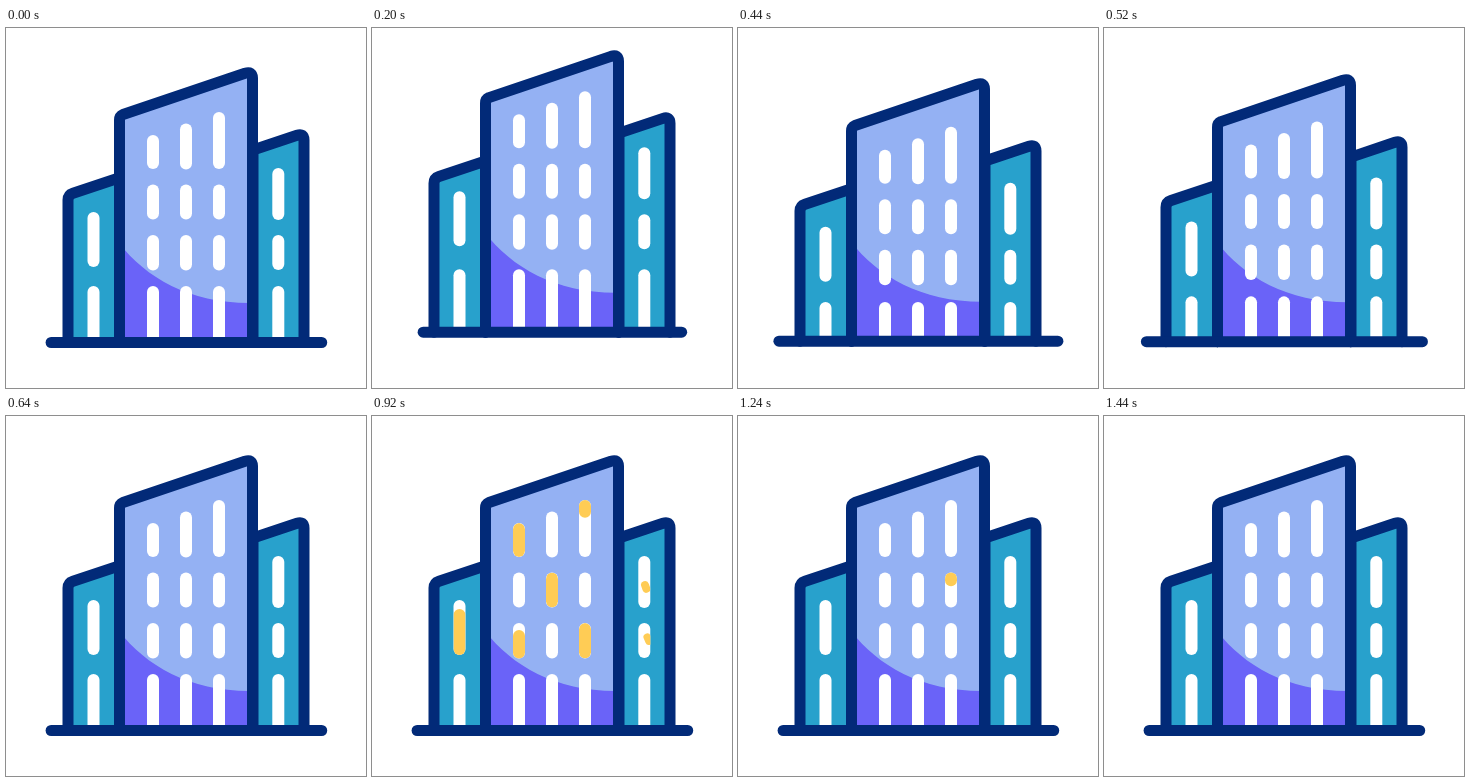
An HTML page with a canvas for the animation above (1.48 s loop, 360 by 360 pixels).

```html
<!DOCTYPE html>
<html lang="en">
<head>
<meta charset="utf-8">
<title>Buildings</title>
<style>
  html, body { margin: 0; width: 100%; height: 100%; overflow: hidden; background: #fff; }
  canvas { display: block; width: 360px; height: 360px; }
</style>
</head>
<body>
<canvas id="stage"></canvas>
<script>
const LOOP = 1480, STEP = 40, SLIDE = 140;
const NAVY = '#022a78', TEAL = '#28a1cc', BLUE = '#94b1f3', VIOLET = '#6a63f8', YELLOW = '#ffcc55';

const canvas = document.getElementById('stage');
const ctx = canvas.getContext('2d');
const ratio = window.devicePixelRatio || 1;
canvas.width = canvas.height = 360 * ratio;

// Panes: centre x, top, bottom, light enters, light leaves, optional growth point
const panes = [
  { x: 147, top: 107, end: 141, on: 700, off: 930 },
  { x: 180, top: 95.5, end: 141.5, on: 928, off: 1090 },
  { x: 213, top: 84, end: 141, on: 645, off: 832 },
  { x: 147, top: 156.5, end: 191.5 },
  { x: 180, top: 156.5, end: 191.5, on: 710, off: 935 },
  { x: 213, top: 156.5, end: 191.5, on: 1006, off: 1160 },
  { x: 147, top: 207, end: 242.5, on: 820, off: 1085 },
  { x: 180, top: 207, end: 242.5 },
  { x: 213, top: 207, end: 242.5, on: 760, off: 1003 },
  { x: 87.5, top: 184, end: 239, on: 816, off: 1016 },
  { x: 272.3, top: 140, end: 192, on: 880, off: 1034, seed: [274, 172] },
  { x: 272.3, top: 207, end: 242, on: 885, off: 940, seed: [276.5, 223] }
];
const doors = [87.5, 147, 180, 213, 272.3];

const lift = [[80, 0], [280, -26], [440, 11], [640, 0]];
const paneLift = [[80, 0], [280, -32], [440, 14.7], [640, 0]];
const doorLift = [[80, 0], [280, -26], [440, 16], [640, 0]];
const groundLift = [[80, 0], [280, -16], [400, 0], [440, -1.3], [640, 0]];
const groundHalf = [[80, 135.3], [280, 126], [400, 141.5], [440, 139.5], [640, 135.3]];

const ease = p => { p = Math.min(1, Math.max(0, p)); return p * p * (3 - 2 * p); };
const mix = (a, b, p) => a + (b - a) * p;

function at(keys, t) {
  let value = keys[0][1];
  for (let i = 1; i < keys.length; i++) {
    const [t0] = keys[i - 1], [t1, v1] = keys[i];
    value = mix(value, v1, ease((t - t0) / (t1 - t0)));
  }
  return value;
}

function capsule(x, top, end, w = 12) {
  const p = new Path2D();
  p.roundRect(x - w / 2, top, w, end - top, w / 2);
  return p;
}

function fill(path, color) {
  ctx.fillStyle = color;
  ctx.fill(path);
}

function outline(path) {
  ctx.strokeStyle = NAVY;
  ctx.lineWidth = 11;
  ctx.lineCap = ctx.lineJoin = 'round';
  ctx.stroke(path);
}

function leftBlock(y, base) {
  return new Path2D(`M62 ${base}V${172 + y}Q62 ${167 + y} 67 ${165.3 + y}L113.5 ${149.8 + y}V${base}`);
}

function rightBlock(y, base) {
  return new Path2D(`M247 ${base}V${122 + y}L291 ${107.2 + y}Q298 ${105 + y} 298 ${112 + y}V${base}`);
}

function tower(y, base) {
  return new Path2D(`M113.5 ${base}V${92 + y}Q113.5 ${88 + y} 117 ${86.5 + y}` +
    `L239 ${45.2 + y}Q246.5 ${43 + y} 246.5 ${50 + y}V${base}`);
}

function drawLight(p, t) {
  if (!p.on || t <= p.on || t >= p.off + SLIDE) return;
  const enter = ease((t - p.on) / SLIDE), leave = ease((t - p.off) / SLIDE);
  const h = p.end - p.top;
  ctx.save();
  ctx.clip(capsule(p.x, p.top, p.end));
  if (p.seed && t < p.off) {
    // The right-hand lights swell from a small tilted drop
    const g = ease((t - p.on) / 80 - 0.05);
    const len = mix(8, h, Math.max(0, g * 2 - 1));
    ctx.translate(mix(p.seed[0], p.x, g * g), mix(p.seed[1], p.top + h / 2, g * g));
    ctx.rotate(-0.6 * (1 - g));
    fill(capsule(0, -len / 2 - 2, len / 2 + 2, mix(5, 12, g)), YELLOW);
  } else {
    const y = (p.seed ? 0 : h * (1 - enter)) - h * leave;
    fill(capsule(p.x, p.top + y, p.end + y), YELLOW);
  }
  ctx.restore();
}

function draw(t) {
  const y = at(lift, t), py = at(paneLift, t), dy = at(doorLift, t);
  const gy = at(groundLift, t), half = at(groundHalf, t), base = 314.5 + gy;

  ctx.setTransform(ratio, 0, 0, ratio, 0, 0);
  ctx.fillStyle = '#fff';
  ctx.fillRect(0, 0, 360, 360);

  for (const block of [leftBlock(y, base), rightBlock(y, base)]) {
    fill(block, TEAL);
    outline(block);
  }

  const main = tower(y, base);
  fill(main, BLUE);
  ctx.save();
  ctx.clip(main);
  ctx.translate(0, gy);
  fill(new Path2D('M113 215C140 250 185 276 247 275V320H113Z'), VIOLET);
  ctx.restore();

  ctx.save();
  ctx.beginPath();
  ctx.rect(0, 0, 360, base);
  ctx.clip();
  for (const x of doors) fill(capsule(x, 258 + dy, 345 + dy), '#fff');
  for (const p of panes) {
    fill(capsule(p.x, p.top + py, p.end + py), '#fff');
    drawLight(p, t);
  }
  ctx.restore();

  outline(main);
  outline(new Path2D(`M${180.4 - half} ${base}H${180.4 + half}`));
}

const start = performance.now();
function tick() {
  const t = (performance.now() - start) % LOOP;
  draw(Math.floor(t / STEP) * STEP);
  requestAnimationFrame(tick);
}
tick();
</script>
</body>
</html>
```
